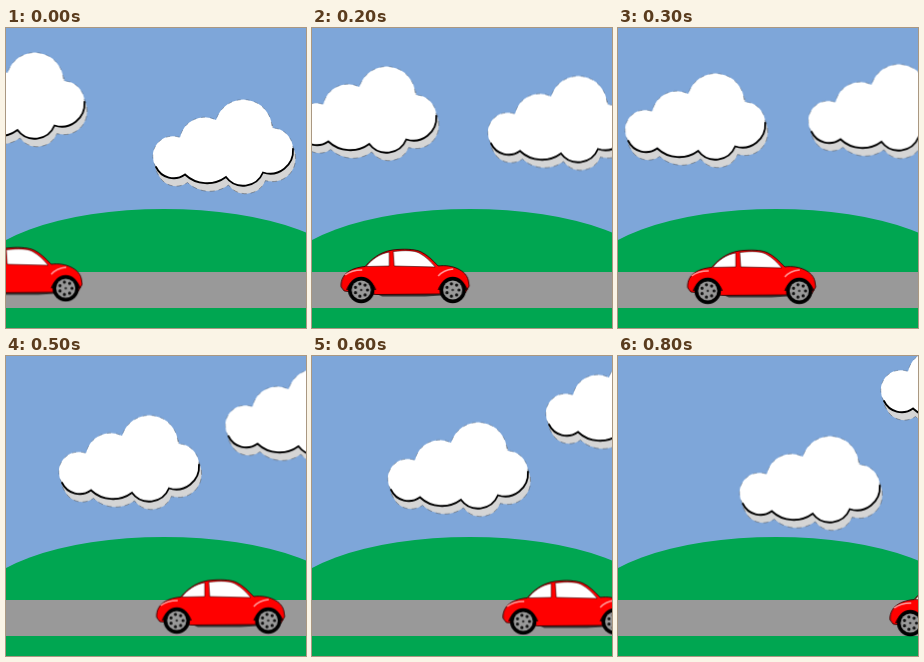
Write an HTML page without scripts that moves like this. It is 300 px wide and 300 px high and loops after 0.9 s.

```html
<!DOCTYPE html>
<html lang="en">
<head>
<meta charset="utf-8">
<title>Car on the road</title>
<style>
  html, body { margin: 0; width: 100%; height: 100%; overflow: hidden; background: #7ea6d9; }
  svg { display: block; width: 100%; height: 100%; }

  /* Each mover starts at (--x, --y) and shifts by (--dx, --dy) nine times per loop. */
  .mover { animation: drift 900ms steps(9, end) infinite; }
  @keyframes drift {
    from { transform: translate(var(--x), var(--y)); }
    to {
      transform: translate(calc(var(--x) + 9 * var(--dx)), calc(var(--y) + 9 * var(--dy)));
    }
  }
  .near { --x: -60.5px; --y: 24px; --dx: 22.9px; --dy: 6.95px; }
  .far { --x: 148px; --y: 71px; --dx: 14.5px; --dy: -11.75px; }
  .car { --x: -52.8px; --y: 218.3px; --dx: 40.5px; --dy: .85px; }
</style>
</head>
<body>
<svg viewBox="0 0 300 300">
  <defs>
    <path id="puff" d="M2 68 A20 20 0 0 1 26 38.5 A25 25 0 0 1 62 21 A28.6 28.6 0 0 1 118 29
      A21 21 0 0 1 139 50 A23 23 0 0 1 109 73.5 A21.4 21.4 0 0 1 72 78
      A32 32 0 0 1 31 75.5 A19.5 19.5 0 0 1 2 68Z"/>
    <g id="cloud">
      <use href="#puff" x="2.5" y="8" fill="#d5d5d5" stroke="#555" stroke-width=".5" stroke-dasharray="5 4"/>
      <use href="#puff" fill="#fff" stroke="#456" stroke-width=".4" stroke-dasharray="4 5"/>
      <path d="M139 50 A23 23 0 0 1 109 73.5 A21.4 21.4 0 0 1 72 78
        A32 32 0 0 1 31 75.5 A19.5 19.5 0 0 1 2 68"
        fill="none" stroke="#000" stroke-width="1.8" stroke-linecap="round"/>
    </g>
    <g id="wheel">
      <circle r="13.2"/>
      <circle r="9.6" fill="#999"/>
      <circle r="6.3" fill="none" stroke="#111" stroke-width="3.2" stroke-linecap="round"
        pathLength="7" stroke-dasharray="0 1"/>
      <circle r="1.3" fill="#333"/>
    </g>
  </defs>

  <rect width="300" height="300" fill="#7ea6d9"/>
  <ellipse cx="158" cy="251" rx="190" ry="70" fill="#00a651"/>
  <rect y="240" width="300" height="60" fill="#00a651"/>
  <rect y="244" width="300" height="36" fill="#999"/>

  <use class="mover near" href="#cloud"/>
  <use class="mover far" href="#cloud"/>

  <g class="mover car">
    <path d="M34 45 H101 V47.5 L85 48.5 H42Z" fill="#333"/>
    <path d="M1 39 C0 28 8 20 25 18.5 C34 8 43 2.5 57 1.5 C68 .8 76 1.5 81 4
      C88 7.5 92 12 98 18 C113 16 126 23 128 32 L129 38 L125 45 L98 46 L36 46.5 L4 43Z"
      fill="#f00" stroke="#300" stroke-width=".9" stroke-linejoin="round"/>
    <path d="M6 42 A15.5 15.5 0 0 1 36 42Z M97.5 42 A15.5 15.5 0 0 1 127.5 42Z" fill="#300"/>
    <g fill="#fff" stroke="#300" stroke-width=".6">
      <path d="M26 18.5 C32 11 39 6 49 4 L49 18Z"/>
      <path d="M53 3.5 C66 2 74 2.5 79 5 C86 9 90 13 95 19 L54 18Z"/>
    </g>
    <path d="M5 27 Q11 22 22 22 M98 28 Q103 22 113 21" fill="none" stroke="#ff9c9c" stroke-width="1.3"/>
    <use href="#wheel" x="21" y="42"/>
    <use href="#wheel" x="112.5" y="42"/>
  </g>
</svg>
</body>
</html>
```
